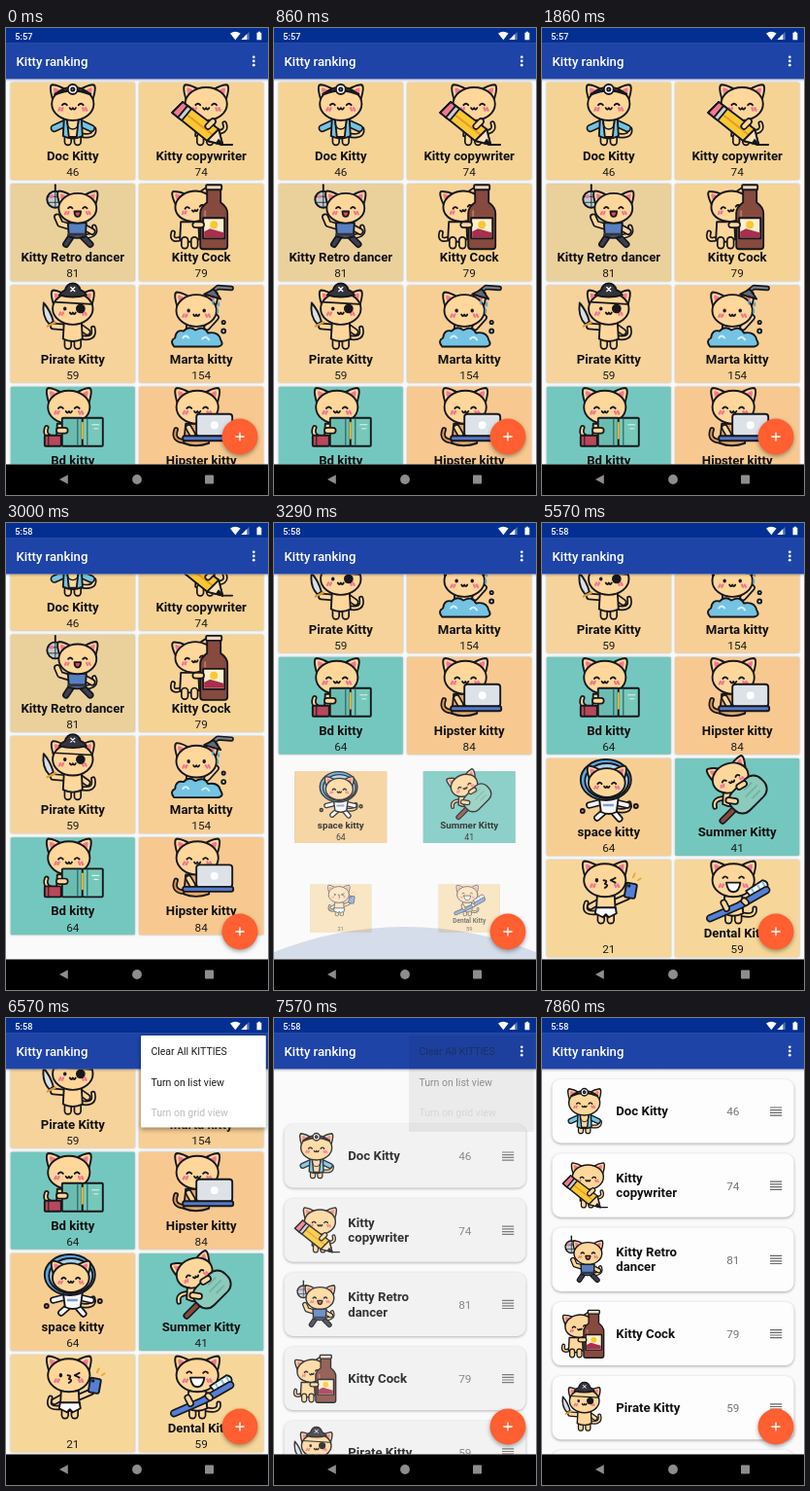
Recreate the animation shown at these times as an HTML page. Size 270x480 px, loop 8 s.

```html
<!DOCTYPE html>
<html lang="en">
<head>
<meta charset="utf-8">
<title>Kitty ranking</title>
<style>
html, body { margin: 0; width: 100%; height: 100%; overflow: hidden; background: #fafafa; }
svg { display: block; width: 100vw; height: 100vh; font-family: Roboto, sans-serif; }
.art { stroke: #17171a; stroke-width: 1.9; stroke-linecap: round; stroke-linejoin: round; }
.tile { filter: drop-shadow(0 .8px .8px rgba(0,0,0,.3)); }
.row { fill: var(--card); filter: drop-shadow(0 1.4px 1.8px rgba(0,0,0,.33)); }
.name { font-weight: 700; font-size: 13.2px; fill: #111; }
.votes { font-size: 11.8px; text-anchor: middle; }
.mid { text-anchor: middle; }
#menu text { font-size: 10.5px; }
</style>
</head>
<body>
<svg id="stage" viewBox="0 0 270 480"></svg>
<script>
const LOOP = 8000, STEP = 1000 / 7;
const CAT = '#ffd79a', PINK = '#f2788f', INK = '#17171a', BLUE = '#75c3e2', WHITE = '#f8f8fa', BROWN = '#864a3f';

// drawing helpers
const path = (d, fill = 'none', more = '') => `<path d="${d}" fill="${fill}" ${more}/>`;
const oval = (x, y, rx, ry, fill, more = '') => `<ellipse cx="${x}" cy="${y}" rx="${rx}" ry="${ry}" fill="${fill}" ${more}/>`;
const box = (x, y, w, h, fill, r = 0, more = '') => `<rect x="${x}" y="${y}" width="${w}" height="${h}" rx="${r}" fill="${fill}" ${more}/>`;
const text = (x, y, s, more = '') => `<text x="${x}" y="${y}" ${more}>${s}</text>`;
const group = (move, inner, more = '') => `<g transform="${move}" ${more}>${inner}</g>`;
const limb = (d, color = CAT, w = 5) =>
  path(d, 'none', `stroke-width="${w + 3.4}"`) + path(d, 'none', `stroke="${color}" stroke-width="${w}"`);

const MOUTH = 'M-2.6 3.5q1.3 2.6 2.6 0q1.3 2.6 2.6 0';
const FACES = {
  shut: path('M-9 1q2-2.4 4 0M5 1q2-2.4 4 0' + MOUTH),
  dots: oval(-7, 0, .7, 1, INK) + oval(7, 0, .7, 1, INK) + path(MOUTH),
  laugh: path('M-9 0q2-2.4 4 0M5 0q2-2.4 4 0') + path('M-3 3h6q0 5-3 5t-3-5z', '#d94b62'),
  teeth: path('M-9-2q2-2.4 4 0M5-2q2-2.4 4 0') + path('M-6 2h12q-1 8-6 8t-6-8z', '#fff'),
  patch: path('M-17-6L17-4', 'none', 'stroke-width="1.4"') + oval(7, 0, 3.4, 3.4, INK) + oval(-7, 0, .7, 1, INK) + path(MOUTH),
  kiss: oval(-7, 0, .7, 1, INK) + path('M5 0l4-2M5 0l4 2M-1 0q4 0 1 3q4 1 0 3.5')
};

function head(x, y, face = 'shut', s = 1.2, turn = 0) {
  const ear = path('M-17-3Q-21-16-17.5-16.5Q-12-16-6-12z', CAT) + path('M-15.5-8Q-17.5-14-15.5-14Q-13-13-10-11z', PINK, 'stroke="none"');
  const cheek = path('M-12 5.5l1-2M-9.5 5.5l1-2', 'none', `stroke="${PINK}" stroke-width="2"`);
  return group(`translate(${x} ${y}) rotate(${turn}) scale(${s})`,
    ear + group('scale(-1 1)', ear) + oval(0, 0, 18, 14.2, CAT) + cheek + group('scale(-1 1)', cheek) + FACES[face],
    `stroke-width="${1.9 / s}"`);
}
const torso = (x, y, color = CAT) => path(`M${x - 9} ${y}h18l1 18q-10 5-20 0z`, color);
const legs = (x, y) => limb(`M${x - 5} ${y}v5`) + limb(`M${x + 5} ${y}v5`);

const art = [
  // doctor
  limb('M39 53Q55 56 54 47', CAT, 2) + legs(32, 55) + limb('M24 41L13 46', BLUE) + limb('M40 41L51 46', BLUE) +
  torso(32, 36, BLUE) + path('M26 36h12l-2 19h-8z', CAT) + path('M26 38q0 9 6 9t6-9', 'none', 'stroke-width="1.3"') +
  head(32, 21) + path('M14 11Q32 3 50 11', 'none', 'stroke-width="3"') + oval(32, 6, 5, 5, WHITE) + oval(32, 6, 1.6, 1.6, '#b6c6d0'),
  // writer
  limb('M44 50Q60 51 56 41', CAT, 2) + torso(36, 36) + legs(36, 55) + head(37, 21) +
  path('M2 30L13 19L50 47L54 63L38 59z', '#f9c833') + path('M8 25L44 53', 'none', 'stroke="#e49b26"') +
  path('M2 30L13 19L18 23L8 35z', PINK) + path('M18 23l4 3l-10 12l-4-3z', '#c7d1d6') + path('M50 47L54 63L38 59z', '#fbe2b8') +
  path('M50 58l4 5l-6-2z', INK) + path('M54 63h10') + limb('M44 39l-5 5', CAT, 4),
  // dancer
  path('M14 0v8') + oval(14, 15, 8.5, 8.5, '#bdcbd4') + path('M7 12h14M7 18h14M14 7v16', 'none', 'stroke-width=".8"') +
  oval(10, 12, 2, 2, PINK, 'stroke="none"') + limb('M45 53Q58 52 54 43', CAT, 2) +
  limb('M31 52L25 61', '#3c3e52', 4) + limb('M41 52L50 61', '#3c3e52', 4) + limb('M29 43L19 40L16 33', CAT, 4) + limb('M43 43L52 48', CAT, 4) +
  path('M27 39h19l-1 14q-8 3-17 0z', '#587fc1') + path('M28 51h16', 'none', 'stroke="#34343d" stroke-width="3"') + head(37, 24, 'laugh', 1.08),
  // bottle
  limb('M14 54Q0 60 3 49', CAT, 2) + torso(20, 38) + legs(20, 57) + head(25, 22, 'shut', 1.1, -8) +
  path('M38 2h14v16q7 5 7 11v34q0 3-3 3H34q-3 0-3-3V29q0-6 7-11z', BROWN) + box(37, 0, 16, 5, '#f0d9c0', 1) +
  path('M36 27v5', 'none', 'stroke="#b47a66"') + box(34, 34, 22, 21, '#fff0d0') + oval(45, 41, 4, 4, '#f9c833', 'stroke="none"') +
  path('M35 48l6-3l14 4v5H35z', '#a82f4d', 'stroke="none"') + limb('M26 41h6', CAT, 4),
  // pirate
  limb('M39 52Q56 56 53 43', CAT, 2) + legs(32, 56) + limb('M24 42L12 41', CAT, 4) + limb('M40 42l7 5', CAT, 4) + torso(32, 36) +
  path('M8 39Q0 31 2 17Q9 25 12 36z', '#d6e0e6') + path('M6 41l8-4', 'none', 'stroke="#d99b35" stroke-width="2.4"') +
  head(32, 23, 'patch', 1.15) + path('M18 9Q21 5 24 4Q26-3 32-3Q38-3 40 4Q44 5 46 9Q32 13 18 9z', '#34343d') +
  path('M30 1l4 4M34 1l-4 4', 'none', 'stroke="#fff" stroke-width="1.3"'),
  // shower
  torso(26, 37) + limb('M38 42L47 32', CAT, 4) + head(27, 25, 'dots', 1.15) + limb('M63 2L49 1L44 5', '#7b8490', 2) + path('M35 8L45 3L52 13z', '#626b77') +
  path('M44 15v3M50 17v3M49 24v3', 'none', 'stroke="#4fa7d6"') +
  path('M4 62Q-1 56 5 53Q6 44 14 46Q19 40 26 45Q35 40 39 48Q50 46 52 55Q56 61 49 62z', BLUE) +
  path('M13 53q3-4 6 0M33 54q4-4 7 1', 'none', 'stroke="#d4f0fa"') + oval(55, 46, 2, 2, '#c7eaf5') + oval(55, 37, 1.6, 1.6, '#c7eaf5'),
  // reader
  limb('M17 53Q1 51 5 41', CAT, 2) + torso(25, 37) + head(28, 20) + box(3, 49, 17, 11, '#b8485c', 1) + path('M7 49v11', 'none', 'stroke-width="1"') +
  box(21, 31, 21, 29, '#6bbcb0', 1) + box(42, 31, 21, 29, '#76c8bb', 1) +
  path('M37 32v27M47 32v27', 'none', 'stroke="#27655f" stroke-width="1.2"') + path('M42 36v16', 'none', 'stroke="#f3bd35"') +
  path('M52 38h7M54 42h4', 'none', 'stroke="#dff3ef" stroke-width="1.2"') + limb('M18 44h6', CAT, 4),
  // laptop
  limb('M14 55Q2 54 6 43', '#d99758', 2) + path('M16 37h24v20q-14 5-26 0z', '#e5a965') + head(28, 20) + limb('M19 41L23 48', CAT, 4) +
  box(27, 27, 37, 23, '#dce2e7', 3) + oval(45.5, 38.5, 4, 4, '#fff', 'stroke="none"') + box(13, 49.5, 52, 5, '#5479cb', 2),
  // space
  limb('M38 52Q56 55 53 45', CAT, 2) + limb('M28 53L20 60', WHITE, 4) + limb('M36 53L43 61', WHITE, 4) + limb('M24 44L12 47', WHITE, 4) + limb('M38 44L51 47', WHITE, 4) +
  path('M22 39h20l-2 15q-8 4-16 0z', WHITE) + oval(29, 21, 26, 21, '#58a9e6') + oval(30, 22, 22.5, 18, '#a9d2ea') + head(30, 24, 'shut', 1.05) +
  path('M27 47h9', 'none', 'stroke="#7f9fd0" stroke-width="2.5"') + oval(60, 48, 2, 2, '#f3bd35') + oval(5, 53, 2, 2, PINK),
  // ice pop
  limb('M17 63L30 50', BROWN, 4) + limb('M17 40Q7 41 9 49', CAT, 2) + torso(27, 28) + head(25, 19, 'shut', 1.05, -22) +
  group('rotate(45 43 36)', box(30, 15, 26, 42, '#8acbbb', 11) + path('M37 25v10M43 23v16M49 25v10', 'none', 'stroke="#74b4a6"')) +
  limb('M34 28l5-3', CAT, 4) + limb('M23 42l7 1', CAT, 4),
  // selfie
  limb('M20 53Q4 55 9 43', CAT, 2) + legs(29, 56) + limb('M37 43L51 37', CAT, 4) + limb('M22 42l-9 5', CAT, 4) + torso(29, 36) +
  path('M19 48h20l1 6l-8 4l-3-3l-3 3l-8-4z', WHITE) + head(28, 20, 'kiss') +
  group('rotate(10 54 31)', box(49, 23, 11, 15, '#557fd6', 2) + oval(52, 26, .7, .7, '#fff')) + path('M57 17l2-4M62 20l3-2', 'none', 'stroke="#f3a735"'),
  // toothbrush
  limb('M37 55Q51 58 50 49', CAT, 2) + legs(28, 56) + torso(28, 36) + head(28, 20, 'teeth') +
  path('M41 31L58 20Q65 21 63 28L47 38z', WHITE) + path('M47 29l3 5M53 25l3 5M58 22l3 5', 'none', 'stroke="#75c3e2"') +
  limb('M4 59L34 46L62 30', '#547fd6', 5) + limb('M18 43l3 6', CAT, 4) + limb('M39 41l2 2', CAT, 4)
];

const SAND = '#f5d394', TEAL = '#74c7be';
const kitties = [
  ['Doc Kitty', 46, SAND], ['Kitty|copywriter', 74, SAND], ['Kitty Retro|dancer', 81, '#ead09b'],
  ['Kitty Cock', 79, SAND], ['Pirate Kitty', 59, '#f6d39b'], ['Marta kitty', 154, '#f7cf94'],
  ['Bd kitty', 64, TEAL], ['Hipster kitty', 84, '#f7c990'], ['space kitty', 64, '#f7ce92'],
  ['Summer Kitty', 41, TEAL], ['', 21, '#f7d799'], ['Dental Kitty', 59, '#f7d799']
];

const tileAt = i => [68.8 + 132.4 * (i % 2), 106 + 104.25 * Math.floor(i / 2)];
const tile = ([name, votes, color], i) => `<g id="tile${i}">` +
  box(-64, -50, 128, 100, color, 1.2, 'class="tile"') +
  group('translate(-32 -49)', art[i], 'class="art"') +
  text(0, 30, name.replace('|', ' '), 'class="name mid"') +
  text(0, 46.2, votes, 'class="votes" fill="#1c1c1c"') + '</g>';

const row = ([name, votes], i) => {
  const lines = name.split('|'), first = 4.5 - 7.8 * (lines.length - 1);
  return group(`translate(0 ${95.8 + 76.2 * i})`,
    box(10.5, -32.7, 249, 65.4, '#fdfdfd', 9, 'class="row"') +
    group('translate(20 -24) scale(.74)', art[i], 'class="art"') +
    lines.map((s, n) => text(76.3, first + 15.6 * n, s, 'class="name"')).join('') +
    text(196.8, 4.6, votes, 'class="votes" fill="#757575"') +
    path('M235 -3.8h12.2M235 -1.1h12.2M235 1.6h12.2M235 4.3h12.2', 'none', 'stroke="#666" stroke-width="1.2"'));
};

document.getElementById('stage').innerHTML =
  '<clipPath id="page"><path d="M0 52.5h270v396H0z"/></clipPath>' +
  '<linearGradient id="fall" x2="0" y2="1"><stop stop-opacity=".2"/><stop offset="1" stop-opacity="0"/></linearGradient>' +
  box(0, 0, 270, 480, '#fafafa') +
  `<g clip-path="url(#page)"><g id="grid">${kitties.map(tile).join('')}</g>` +
  `<g id="list">${kitties.slice(0, 6).map(row).join('')}</g>` +
  oval(135, 778, 363, 363, '#1f4a98', 'id="glow"') + '</g>' +
  box(0, 52.5, 270, 3, 'url(#fall)') +
  box(0, 15.7, 270, 36.8, '#1f44a8') + box(0, 0, 270, 15.8, '#032f92') +
  text(9.3, 11.8, '', 'id="clock" font-size="9.2" font-weight="500" fill="#fff"') +
  path('M231 5.6Q236.3 1.8 241.6 5.6L236.3 12.2zM242.4 12.1h5.8v-5.8zM258.5 4.8h1.3v-1h2.2v1h1.3v7.4h-4.8z', '#fff') +
  path('M242.4 12.1h8.2v-8.2z', '#fff', 'opacity=".35"') +
  text(10.6, 39, 'Kitty ranking', 'font-size="13.125" font-weight="500" fill="#fff"') +
  [29.8, 34, 38.2].map(y => oval(255.3, y, 1.4, 1.4, '#fff')).join('') +
  oval(241, 420, 18.5, 18.5, '#ff5f31', 'style="filter:drop-shadow(0 2px 2px rgba(0,0,0,.35))"') +
  path('M236.4 420h9.2M241 415.4v9.2', 'none', 'stroke="#fff" stroke-width="1.4"') +
  '<g id="menu">' + box(139, 18, 128.8, 94.6, '#fff', 1.3, 'id="panel" style="filter:drop-shadow(0 2px 2.5px rgba(0,0,0,.4))"') +
  box(139, 18, 128.8, 99, '#000', 1.3, 'id="shade"') + '<g id="choices">' +
  text(149.4, 38, 'Clear All KITTIES', 'fill="#1d1d1d"') + text(149.4, 69.5, 'Turn on list view', 'fill="#1d1d1d"') +
  text(149.4, 101, 'Turn on grid view', 'fill="#bdbdbd"') + '</g></g>' +
  box(0, 448.5, 270, 31.5, '#000') +
  path('M63.8 459.2v9.6L55 464z', '#8d8d8d') + oval(135, 464, 4.9, 4.9, '#8d8d8d') + box(205, 459.5, 9, 9, '#8d8d8d', .8);

// timing
const SCROLL_IN = 2960, SCROLL_TIME = 240, POP_TIME = 330;
const MENU_IN = 5690, LIST_IN = 7360, MENU_OUT = 7500, MENU_GONE = 7650;
const popStart = [0, 0, 0, 0, 3041, 3123];

const $ = id => document.getElementById(id);
const part = (t, from, span) => Math.min(1, Math.max(0, (t - from) / span));
const slowOut = (p, power = 2) => 1 - (1 - p) ** power;
const show = (id, alpha) => {
  $(id).style.display = alpha > 0 ? '' : 'none';
  $(id).setAttribute('opacity', alpha);
};

function draw(t) {
  const scroll = 231 * slowOut(part(t, SCROLL_IN, SCROLL_TIME), 1.2);
  kitties.forEach((_, i) => {
    const [x, y] = tileAt(i), start = popStart[Math.floor(i / 2)];
    const size = start ? part(t, start, POP_TIME) : 1;
    $('tile' + i).setAttribute('transform', `translate(${x} ${y - scroll}) scale(${size})`);
    show('tile' + i, Math.min(1, size * 1.1));
  });
  $('clock').textContent = t < 2990 ? '5:57' : '5:58';
  show('glow', .17 * part(t, 3190, 90) * (1 - part(t, 3300, 600)));

  const arrive = slowOut(part(t, LIST_IN, 400));
  const level = 253 - 60 * (1 - arrive);
  show('grid', t < LIST_IN ? 1 : 0);
  show('list', t < LIST_IN ? 0 : Math.min(1, arrive * 1.1));
  $('list').setAttribute('transform', `translate(0 ${207 * (1 - arrive)})`);
  $('list').style.setProperty('--card', `rgb(${level},${level},${level})`);

  const closing = t >= MENU_OUT;
  show('menu', t < MENU_GONE ? part(t, MENU_IN, 120) : 0);
  show('panel', closing ? 0 : 1);
  show('shade', closing ? .06 : 0);
  show('choices', closing ? .45 : 1);
}

const begin = performance.now();
function tick() {
  const t = (performance.now() - begin) % LOOP;
  draw(Math.floor((t + 6) / STEP) * STEP % LOOP);
  requestAnimationFrame(tick);
}
tick();
</script>
</body>
</html>
```
